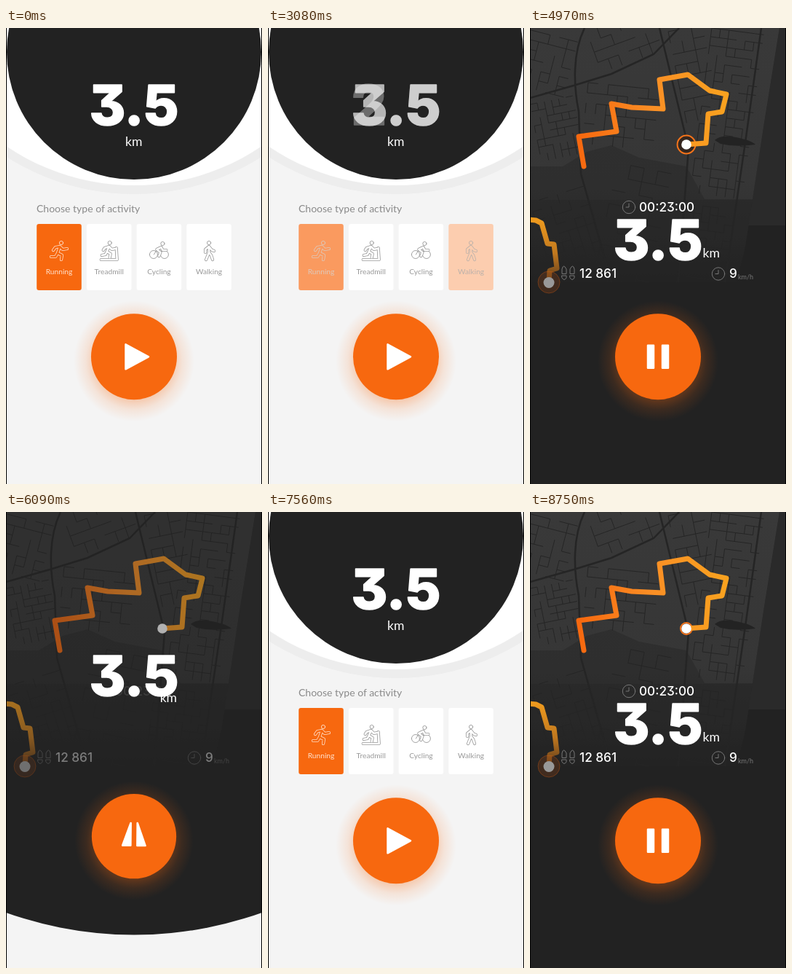
An HTML page for the animation above (8.82 s loop, 352 px wide and 626 px high).

```html
<!DOCTYPE html>
<html lang="en">
<head>
<meta charset="utf-8">
<title>Activity tracker</title>
<style>
  html, body { margin: 0; width: 100%; height: 100%; overflow: hidden; background: #f4f4f4; }
  svg { display: block; width: 100%; height: 100%; }
  text { font-family: Lato, sans-serif; }
  .heading { font-size: 14px; fill: #8a8a8a; }
  .card { --bg: #fff; --fg: #999; }
  .card text { font-size: 10.2px; fill: var(--fg); text-anchor: middle; }
  .icon { fill: none; stroke-linecap: round; stroke-linejoin: round; }
  .icon .outer { stroke: var(--fg); stroke-width: 4.2; }
  .icon .inner { stroke: var(--bg); stroke-width: 2.6; }
  .icon .thin { stroke: var(--fg); stroke-width: .9; }
  .number {
    font: 800 76px Inter, sans-serif; font-feature-settings: "cv09";
    fill: #fff; stroke: #fff; stroke-width: 1.6; stroke-linejoin: round; text-anchor: middle;
  }
  .unit { font-size: 17.6px; fill: #fff; }
  .stat { font: 500 17.2px Inter, sans-serif; font-feature-settings: "cv09"; fill: #fff; }
  .small { font-size: 9px; fill: #777; }
  .line { fill: none; stroke: #777; stroke-width: 1; stroke-linecap: round; }
  .road { fill: none; stroke: #252525; }
  .route { fill: none; stroke-width: 7; stroke-linecap: round; stroke-linejoin: round; }
</style>
</head>
<body>
<svg viewBox="0 0 352 626" preserveAspectRatio="none">
  <defs>
    <linearGradient id="land" x1="0" y1="0" x2="0" y2="349" gradientUnits="userSpaceOnUse">
      <stop offset="0" stop-color="#393939"/><stop offset=".6" stop-color="#363636"/>
      <stop offset=".85" stop-color="#2e2e2e"/><stop offset="1" stop-color="#262626"/>
    </linearGradient>
    <linearGradient id="warm" x1="67" y1="0" x2="270" y2="0" gradientUnits="userSpaceOnUse">
      <stop offset="0" stop-color="#f7680f"/><stop offset=".5" stop-color="#fa8f25"/><stop offset="1" stop-color="#f9a21f"/>
    </linearGradient>
    <linearGradient id="warmLow" x1="0" y1="262" x2="0" y2="349" gradientUnits="userSpaceOnUse">
      <stop offset="0" stop-color="#ee9a1e"/><stop offset=".55" stop-color="#c0781f"/><stop offset="1" stop-color="#5c3a1c"/>
    </linearGradient>
    <radialGradient id="glow">
      <stop offset=".64" stop-color="#f7680f" stop-opacity=".3"/>
      <stop offset=".8" stop-color="#f7680f" stop-opacity=".12"/>
      <stop offset=".93" stop-color="#f7680f" stop-opacity=".04"/>
      <stop offset="1" stop-color="#f7680f" stop-opacity="0"/>
    </radialGradient>
    <clipPath id="inDark"><circle class="dark" cx="176"/></clipPath>
    <clipPath id="inLand"><path d="M0 0H343L322 130L296 300L284 349H0Z"/></clipPath>
    <g id="clock" class="line"><circle r="8.7"/><path d="M0 -5V0H-4"/></g>
  </defs>

  <rect width="352" height="626" fill="#f4f4f4"/>
  <circle id="ring" cx="176" fill="#ededed"/>
  <circle id="white" cx="176" fill="#fff"/>
  <text class="heading" x="42" y="253">Choose type of activity</text>
  <g id="cards"></g>

  <circle class="dark" cx="176" fill="#222"/>
  <g clip-path="url(#inDark)"><g id="map">
    <path d="M343 0H352V271H300L322 130Z" fill="#2a2a2a"/>
    <g clip-path="url(#inLand)">
      <rect width="352" height="349" fill="url(#land)"/>
      <path d="M0 190L45 190L78 170L112 161L150 178L215 190L240 235H310V349H0Z" fill="#222" opacity=".35"/>
      <path d="M0 236H310V349H0Z" fill="#222" opacity=".2"/>
      <path id="streets" class="road" stroke-width="1"/>
      <path class="road" stroke-width="2.5" d="M75 0C58 35 60 80 67 115L70 200L112 349M0 96L60 79L112 63L170 36L205 0M178 0L193 62L218 165L204 349M318 0L297 150L268 349"/>
    </g>
    <path d="M254 154Q262 146 283 150T310 160Q283 164 262 159Z" fill="#232323"/>
    <path class="route" stroke="url(#warmLow)" d="M-4 263L8 264L16 268L24 296L33 297L37 330L27 333L26 349"/>
    <circle cx="26" cy="349" r="15" fill="#f7680f" fill-opacity=".15" stroke="#f7680f" stroke-opacity=".3"/>
    <circle cx="26" cy="349.5" r="7.5" fill="#999"/>
    <circle id="pulse" cx="215" cy="160" fill="#35271f" stroke="#f7741a" stroke-width="2"/>
    <path class="route" stroke="url(#warm)" d="M74 190L67 149L119 142L112 104L140 109L183 111L178 71L217 64L247 86L270 91L264 115L245 118L242 158L221 159.5" />
    <circle cx="215" cy="160" r="6.8" fill="#fff"/>
  </g></g>

  <g id="time">
    <use href="#clock" x="136" y="246"/>
    <text class="stat" x="150" y="252">00:23:00</text>
  </g>
  <g id="stats">
    <path class="line" d="M44 337V331Q46 323 50 331V337ZM44 340H50V343Q47 348 44 343ZM55 337V331Q59 323 61 331V337ZM55 340H61V343Q58 348 55 343Z"/>
    <text class="stat" x="68" y="343">12 861</text>
    <use href="#clock" x="259" y="337.5"/>
    <text class="stat" x="274" y="343">9</text>
    <text class="small" x="286" y="345">km/h</text>
  </g>
  <g id="numbers">
    <text class="number" x="176" y="132.5"></text>
    <text class="number" x="176" y="132.5"></text>
  </g>
  <text id="unit" class="unit" x="164" y="162">km</text>

  <g id="button">
    <circle cy="6" r="83" fill="url(#glow)"/>
    <circle r="59" fill="#f7680f"/>
    <path id="symbol" fill="#fff" stroke="#fff" stroke-width="2.5" stroke-linejoin="round"/>
  </g>
  <path d="M.5 0V626M351.5 0V626" stroke="#000"/>
</svg>
<script>
  const LOOP = 8820, STEP = 70, OPEN = 3990, CLOSE = 5810, REPLAY = 7560;
  const $ = s => document.querySelector(s);
  const clamp = v => Math.max(0, Math.min(1, v));
  const smooth = v => (v = clamp(v), v * v * (3 - 2 * v));
  const mix = (a, b, k) => a + (b - a) * k;
  const set = (el, attrs) => { for (const k in attrs) el.setAttribute(k, attrs[k]); };

  const runner = 'M1 -6L-2 3M1 -6L-5 -5L-8 -1M1 -6L5 -2L11 -3M-2 3L4 6L3 12M-2 3L-5 8L-11 8';
  const activities = [
    { name: 'Running', value: '3.5', head: [3, -11], body: runner },
    { name: 'Treadmill', value: '5.0', head: [1, -11],
      body: 'M0 -6L-3 1M0 -6L-6 -4L-8 -1M0 -6L4 -2L8 -3M-3 1L2 4L1 9M-3 1L-5 5L-10 6M-11 12H11L10 -4' },
    { name: 'Cycling', value: '50', head: [5, -10], body: 'M3 -5L-3 -2L2 2L0 7M3 -5L5 -1L10 -1',
      extra: 'M-13 5a5.5 5.5 0 1 0 11 0a5.5 5.5 0 1 0 -11 0M2 5a5.5 5.5 0 1 0 11 0a5.5 5.5 0 1 0 -11 0M-7 5L-4 0' },
    { name: 'Walking', value: '2.5', head: [0, -11],
      body: 'M0 -6V2L-4 12M0 2L3 6L5 12M0 -6L-5 -2L-5 2M0 -6L4 -1L7 0' }
  ];
  const switches = [
    { at: 630, steps: 2, to: 1 }, { at: 1400, steps: 3, to: 2 },
    { at: 2170, steps: 2, to: 3 }, { at: 3010, steps: 3, to: 0 }
  ];

  $('#cards').innerHTML = activities.map((a, i) => `
    <g class="card" transform="translate(${73 + i * 68.7} 0)">
      <rect x="-30.8" y="269" width="61.6" height="91" rx="3" fill="var(--bg)"/>
      <g class="icon" transform="translate(0 306)">
        <path class="thin" d="${a.extra || ''}"/>
        <path class="outer" d="${a.body}"/><path class="inner" d="${a.body}"/>
        <circle class="thin" cx="${a.head[0]}" cy="${a.head[1]}" r="2.6"/>
      </g>
      <text y="338">${a.name}</text>
    </g>`).join('');

  // Street network: rotated grids with random gaps.
  let seed = 11;
  const random = () => (seed = seed * 16807 % 2147483647) / 2147483647;
  function district(x, y, w, h, angle, gap) {
    const c = Math.cos(angle), s = Math.sin(angle);
    const point = (u, v) => `${(x + u * c - v * s).toFixed(1)} ${(y + u * s + v * c).toFixed(1)}`;
    let d = '';
    for (let u = 0; u <= w; u += gap)
      for (let v = 0; v <= h; v += gap) {
        if (random() < .62) d += `M${point(u, v)}L${point(u + gap, v)}`;
        if (random() < .55) d += `M${point(u, v)}L${point(u, v + gap)}`;
      }
    return d;
  }
  $('#streets').setAttribute('d',
    district(-10, 0, 65, 80, .25, 13) + district(0, 105, 55, 75, -.2, 10) +
    district(78, 5, 85, 45, -.35, 15) + district(80, 75, 95, 75, .1, 14) +
    district(190, 5, 45, 120, -.2, 16) + district(250, 0, 60, 225, .13, 12) +
    district(120, 185, 75, 160, .2, 19) + district(205, 240, 75, 105, .13, 11) +
    district(0, 240, 75, 95, -.3, 13));

  function selection(t) {
    let from = 0, to = 0, k = 1;
    for (const s of switches) if (t >= s.at) {
      from = to;
      to = s.to;
      k = clamp((t - s.at + STEP) / (s.steps * STEP));
    }
    return { from, to, k };
  }

  function drawSelection(t) {
    const { from, to, k } = selection(t);
    document.querySelectorAll('.card').forEach((card, i) => {
      const on = i === to ? k : i === from ? 1 - k : 0;
      card.style.setProperty('--bg', `rgb(${mix(255, 247, on)},${mix(255, 104, on)},${mix(255, 15, on)})`);
      card.style.setProperty('--fg', `rgb(${mix(153, 255, on)},${mix(153, 225, on)},${mix(153, 205, on)})`);
    });
    const [old, current] = $('#numbers').children;
    old.textContent = activities[from].value;
    current.textContent = activities[to].value;
    old.setAttribute('opacity', 1 - k);
    current.setAttribute('opacity', k);
  }

  // Two halves of an upright triangle that part into two bars.
  function symbolPath(pause) {
    const top = mix(-20, -15.5, pause), bottom = mix(11.5, 15.5, pause);
    const inner = 6 * smooth(2 * pause), outerBottom = mix(17, 14, pause);
    const outerTop = Math.max(inner, 14 * pause);
    return [-1, 1].map(s =>
      `M${s * inner} ${top}L${s * outerTop} ${top}L${s * outerBottom} ${bottom}L${s * inner} ${bottom}Z`).join('');
  }

  function draw(time) {
    const t = time >= REPLAY ? time - REPLAY + OPEN : time;
    const closing = t >= CLOSE;
    const since = t - (closing ? CLOSE : OPEN);
    const open = closing ? 1 - smooth(since / 700) : smooth(since / 560);
    const cover = closing ? 1 - smooth((since - 20) / 700) : open;
    drawSelection(t);

    document.querySelectorAll('.dark').forEach(c => set(c, { cy: 33 + 38 * cover, r: 175 + 503 * cover }));
    const spread = closing ? 0 : open / .157;
    const cy = -98 - 110 * spread, r = 314 + 306 * spread;
    set($('#white'), { cy, r });
    set($('#ring'), { cy, r: r + 12 });

    set($('#map'), { opacity: open });
    set($('#time'), { opacity: clamp(closing ? 1 - since / 310 : since / 400) });
    set($('#stats'), { opacity: clamp(closing ? 1 - since / 470 : (since - 350) / 400) });
    set($('#numbers'), { transform: `translate(0 ${185 * open})` });
    set($('#unit'), { transform: `translate(${73.5 * open} ${153 * open})` });

    const beat = t > 4620 && t < 5740 ? (1 - Math.cos((t - 4620) / 280 * Math.PI)) / 2 : 0;
    set($('#pulse'), { r: 8 + 5.2 * beat, opacity: closing ? clamp(1 - since / 280) : 1 });

    const arc = Math.sin(Math.PI * clamp(since / 840));
    const lift = closing ? 7 * arc : 0;
    const scale = 1 - (closing ? 1 : 4) * arc / 59;
    set($('#button'), { transform: `translate(176 ${451.3 - lift}) scale(${scale})` });
    const pause = closing ? 1 - smooth(since / 460) : smooth((since - 210) / 400);
    const turn = closing ? 90 * smooth((since - 260) / 420) : 90 + 90 * open;
    set($('#symbol'), { d: symbolPath(pause), transform: `rotate(${turn})` });
  }

  const start = performance.now();
  function tick() {
    const time = (performance.now() - start) % LOOP;
    draw(Math.floor(time / STEP) * STEP);
    requestAnimationFrame(tick);
  }
  tick();
</script>
</body>
</html>
```
